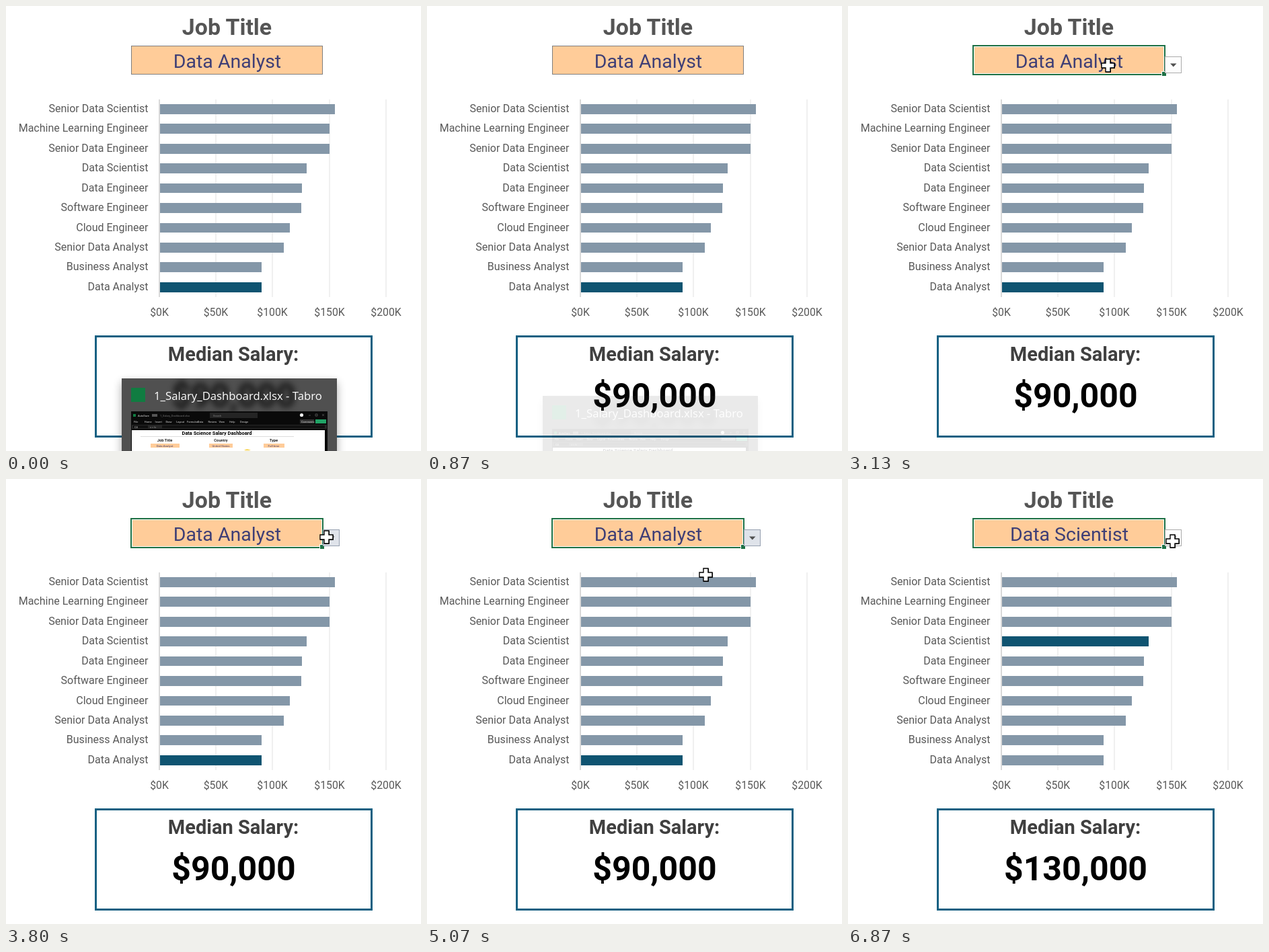
Recreate the animation shown at these times as an HTML page. Size 617 by 662 pixels, loop 8000 ms.

```html
<!DOCTYPE html>
<html lang="en">
<head>
<meta charset="utf-8">
<title>Salary dashboard</title>
<style>
html, body { margin: 0; width: 100%; height: 100%; overflow: hidden; background: #fff; }
svg { display: block; width: 100%; height: 100%; font-family: Roboto, Arial, sans-serif; }
rect, line { shape-rendering: crispEdges; }
.mid { text-anchor: middle; }
.label { font-size: 16px; fill: #595959; }
.ui { font-family: "Open Sans", "Noto Sans", sans-serif; }
.tiny { font-size: 4px; fill: #ddd; }
</style>
</head>
<body>
<svg viewBox="0 0 617 662" xmlns="http://www.w3.org/2000/svg">
  <defs>
    <filter id="soft" x="-20%" y="-60%" width="140%" height="220%"><feGaussianBlur stdDeviation="5"/></filter>
    <filter id="shade" x="-15%" y="-40%" width="130%" height="180%"><feGaussianBlur stdDeviation="7"/></filter>
    <clipPath id="listClip"><rect id="listMask" x="186" y="101" width="310" height="170"/></clipPath>
    <clipPath id="rowsClip"><rect x="187" y="102" width="278" height="168"/></clipPath>
    <clipPath id="headClip"><rect x="172" y="554" width="320" height="120"/></clipPath>
  </defs>

  <text class="mid" x="328.5" y="42.7" font-size="33.9" font-weight="700" fill="#555">Job Title</text>
  <rect x="186.5" y="59.5" width="284" height="42" fill="#fc9" stroke="#7f7f7f"/>
  <text id="job" class="mid" x="329" y="92" font-size="28.5" fill="#3f3f76"></text>

  <g id="chart"></g>

  <rect x="133.5" y="491.5" width="410" height="149" fill="none" stroke="#156082" stroke-width="3"/>
  <text class="mid" x="338" y="528" font-size="29" font-weight="700" fill="#404040">Median Salary:</text>
  <text id="salary" class="mid" x="338.5" y="597" font-size="50" font-weight="700"></text>

  <g id="select">
    <rect x="187.5" y="60.5" width="282" height="40" fill="none" stroke="#fff"/>
    <rect x="186" y="59" width="285" height="43" fill="none" stroke="#1e7145" stroke-width="2"/>
    <rect x="466" y="97" width="7" height="7" fill="#fff"/>
    <rect x="467" y="98" width="6" height="6" fill="#1e7145"/>
    <rect id="button" x="471.5" y="75.5" width="24" height="24"/>
    <path d="M479 85.5h9.5l-4.75 5z" fill="#505050"/>
  </g>

  <g id="list" clip-path="url(#listClip)">
    <rect x="186.5" y="101.5" width="309" height="169" fill="#fff" stroke="#000"/>
    <g id="rows" class="ui" font-size="14.9" clip-path="url(#rowsClip)"></g>
    <rect x="465" y="102" width="30" height="168" fill="#f0f0f0"/>
    <rect x="465" y="133" width="29" height="84" fill="#cdcdcd"/>
    <path d="M474.5 121.5l5.2-5.5 5.2 5.5M474.5 251l5.2 5.5 5.2-5.5" fill="none" stroke="#505050" stroke-width="2.4"/>
  </g>

  <g id="popup">
    <rect x="172" y="560" width="320" height="120" opacity=".32" filter="url(#shade)"/>
    <rect x="172" y="554" width="320" height="120" fill="#505050"/>
    <g clip-path="url(#headClip)">
      <text class="mid" x="338.5" y="597" font-size="50" font-weight="700" opacity=".75" filter="url(#soft)">$90,000</text>
    </g>
    <rect x="186" y="568" width="21" height="21" fill="#107c41"/>
    <text class="ui" x="220" y="586" font-size="16.7" fill="#fff">1_Salary_Dashboard.xlsx - Tabro</text>
    <rect x="186" y="603" width="292" height="70" fill="#0a0a0a"/>
    <rect x="189" y="607" width="4" height="4" fill="#107c41"/>
    <text class="tiny" x="196" y="610.5">AutoSave</text>
    <rect x="217" y="607" width="8" height="4" fill="#555"/>
    <text class="tiny" x="229" y="610.5" opacity=".5">1_Salary_Dashboard.xlsx</text>
    <rect x="303" y="605" width="71" height="8" fill="#242424"/>
    <text class="tiny" x="308" y="610.5" opacity=".5">Search</text>
    <circle cx="439.5" cy="608.5" r="2.6" fill="#eee"/>
    <path d="M450 609h3M460 607h3v3h-3zM470 607l3 3m0-3l-3 3" fill="none" stroke="#777" stroke-width=".6"/>
    <g id="tabs" class="tiny"></g>
    <rect x="437" y="615" width="21" height="6" fill="#333"/>
    <text class="tiny" x="439" y="619.5">Comments</text>
    <rect x="460" y="615" width="16" height="6" fill="#21a366"/>
    <rect x="187" y="623" width="290" height="6" fill="#262626"/>
    <rect x="189" y="624" width="22" height="4" fill="#101010"/>
    <rect x="232" y="624" width="242" height="4" fill="#101010"/>
    <text class="tiny" x="191" y="627.7">C4</text>
    <text class="tiny" x="214" y="627.7" opacity=".6">x v fx</text>
    <rect x="187" y="631" width="287" height="40" fill="#fff"/>
    <text class="mid" x="313.5" y="638" font-size="7.4" font-weight="700">Data Science Salary Dashboard</text>
    <line x1="200" x2="428" y1="640.5" y2="640.5" stroke="#ddd"/>
    <g id="fields" class="mid"></g>
    <path d="M354 661q4-3 10 0z" fill="#f5c518"/>
  </g>

  <g id="cursor">
    <path id="arrow" d="M.5.5v23.2l5.3-5 4 8 3.5-1.6-3.7-7.6h7.6z" fill="#fff" stroke="#000" stroke-width="1.1"/>
    <g id="cross">
      <path d="M-3-9h7v6h6v7h-6v6h-7v-6h-6v-7h6z" fill="#000" stroke="#000"/>
      <path d="M-3.5-9.5h7v6h6v7h-6v6h-7v-6h-6v-7h6z" fill="#fff" stroke="#000" stroke-width="1.4"/>
    </g>
  </g>
</svg>
<script>
const LOOP = 8000;
const $ = id => document.getElementById(id);
const set = (id, attrs) => { for (const k in attrs) $(id).setAttribute(k, attrs[k]); };
const show = (id, on) => { $(id).style.display = on ? '' : 'none'; };

// job title, median salary in thousands
const JOBS = [
  ['Senior Data Scientist', 155], ['Machine Learning Engineer', 150],
  ['Senior Data Engineer', 150], ['Data Scientist', 130],
  ['Data Engineer', 126], ['Software Engineer', 125],
  ['Cloud Engineer', 115], ['Senior Data Analyst', 110],
  ['Business Analyst', 90], ['Data Analyst', 90]
];
const OPTIONS = ['Data Analyst', 'Data Scientist', 'Data Engineer', 'Senior Data Scientist',
  'Senior Data Engineer', 'Senior Data Analyst', 'Business Analyst', 'Software Engineer'];
const SCALE = 1.685, LEFT = 227.9, PITCH = 29.42;

function buildChart() {
  let s = '';
  for (let k = 0; k <= 200; k += 50) {
    const x = Math.round(LEFT + k * SCALE);
    s += `<rect x="${x - 1}" y="139" width="2" height="294" fill="${k ? '#f0f0f0' : '#d9d9d9'}"/>
      <text class="label mid" x="${x}" y="461" style="font-size:15.8px">$${k}K</text>`;
  }
  JOBS.forEach(([name, pay], i) => {
    const top = Math.round(146 + i * PITCH), bottom = Math.round(160.75 + i * PITCH);
    s += `<text class="label" x="211.5" y="${top + 12}" text-anchor="end">${name}</text>
      <rect id="bar${i}" x="229" y="${top}" width="${Math.round(pay * SCALE - 1)}" height="${bottom - top}"/>`;
  });
  $('chart').innerHTML = s;
}

function buildList() {
  $('rows').innerHTML = '<rect id="mark" x="187" width="277" height="21" fill="#0078d7"/>' +
    OPTIONS.map((o, i) => `<text id="opt${i}" x="191" y="${119 + i * 21}">${o}</text>`).join('');
}

function buildThumb() {
  $('tabs').innerHTML = ['File', 'Home', 'Insert', 'Draw', 'Layout', 'Formulas', 'Data', 'Review', 'View', 'Help', 'Design']
    .map((t, i) => `<text x="${190 + i * 15.8}" y="619.5">${t}</text>`).join('');
  $('fields').innerHTML = [['Job Title', 'Data Analyst', 236, 43], ['Country', 'United States', 319.5, 35], ['Type', 'Full-time', 398, 31]]
    .map(([head, val, x, w]) => `<text x="${x}" y="648" font-size="5.8" font-weight="500">${head}</text>
      <rect x="${x - w / 2}" y="651" width="${w}" height="6" fill="#fc9"/>
      <text x="${x}" y="655.7" font-size="4.4" fill="#3f3f76">${val}</text>`).join('');
}

// time, x, y, shape
const POINTER = [
  [0, 0, 0, ''],
  [1400, 340, 331, 'arrow'], [1470, 236, 295, 'arrow'], [1530, 175, 272, 'arrow'],
  [1800, 172, 268, 'arrow'], [1870, 194, 238, 'arrow'], [1930, 262, 172, 'arrow'],
  [2000, 332, 118, 'arrow'], [2070, 370, 99, 'cross'], [2130, 386, 99, 'cross'],
  [2200, 393, 104, 'cross'], [2470, 386, 88, 'cross'],
  [3400, 396, 87, 'cross'], [3470, 424, 85, 'cross'], [3530, 452, 84, 'cross'],
  [3600, 470, 85, 'cross'], [3670, 476, 86, 'cross'],
  [4530, 442, 122, 'cross'], [4600, 424, 154, 'cross'],
  [4870, 420, 149, 'cross'], [4930, 416, 144, 'cross'], [5000, 414, 142, 'cross'],
  [5400, 416, 140, 'cross'], [5470, 424, 134, 'cross'], [5530, 438, 124, 'cross'],
  [5600, 455, 111, 'cross'], [5670, 470, 101, 'cross'], [5800, 477, 97, 'cross'],
  [6000, 482, 93, 'cross'], [6330, 482, 92, 'cross']
];
const POPUP = [[0, 0, 1], [730, 4, .85], [800, 14, .48], [870, 26, .115], [930, 30, 0]]; // time, drop, opacity
const OPEN = [[0, 0], [3870, .35], [3930, .75], [4000, 1], [5070, 0]];
const HOVER = [[0, 0], [4600, 2], [4930, 1]];
const PRESSED = [[0, 0], [3730, 1], [5130, 0]];
const JOB = [[0, 'Data Analyst'], [5130, 'Data Scientist']];
const SALARY = [[0, '$90,000'], [6800, '$130,000']];
const SHIFT = [[0, 0], [6800, .5], [6870, 1]];

const at = (steps, t) => steps.findLast(s => s[0] <= t).slice(1);
const DIM = [132, 151, 168], DARK = [15, 84, 113];
const tone = k => `rgb(${DIM.map((c, i) => Math.round(c + (DARK[i] - c) * k))})`;

function draw(t) {
  const [drop, alpha] = at(POPUP, t);
  set('popup', { transform: `translate(0 ${drop})`, opacity: alpha });

  const [x, y, shape] = at(POINTER, t);
  show('arrow', shape === 'arrow');
  show('cross', shape === 'cross');
  const half = shape === 'cross' ? .5 : 0;
  set('cursor', { transform: `translate(${x + half} ${y + half})` });

  show('select', t >= 3130);
  const [down] = at(PRESSED, t);
  set('button', { fill: down ? '#dfe3ea' : '#fdfdfd', stroke: down ? '#95a0b0' : '#ababab' });

  const [open] = at(OPEN, t), [row] = at(HOVER, t);
  show('list', open > 0);
  set('listMask', { height: 170 * open });
  set('mark', { y: 102 + row * 21 });
  OPTIONS.forEach((_, i) => set('opt' + i, { fill: i === row ? '#fff' : '#000' }));

  $('job').textContent = at(JOB, t)[0];
  $('salary').textContent = at(SALARY, t)[0];
  const [k] = at(SHIFT, t);
  JOBS.forEach(([name], i) => set('bar' + i, {
    fill: tone(name === 'Data Scientist' ? k : name === 'Data Analyst' ? 1 - k : 0)
  }));
}

buildChart();
buildList();
buildThumb();
const start = performance.now();
function tick() {
  draw((performance.now() - start) % LOOP);
  requestAnimationFrame(tick);
}
tick();
</script>
</body>
</html>
```
